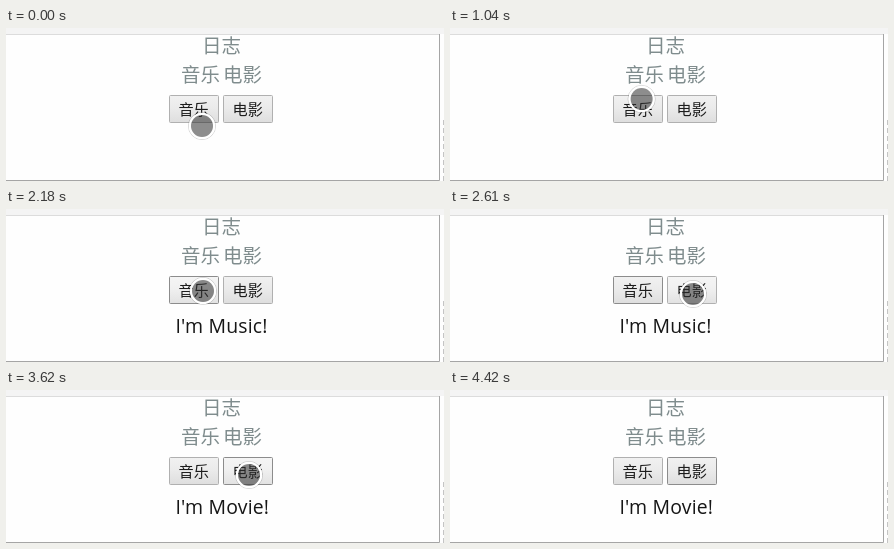
Animation of 438 by 153 pixels, one loop 4.85 s. Source, as an HTML page:

```html
<!DOCTYPE html>
<html lang="zh">
<head>
<meta charset="utf-8">
<style>
html, body { margin: 0; width: 100%; height: 100%; overflow: hidden; background: #fefefe; }
svg { display: block; }
text { font-family: "Noto Sans CJK SC", "Noto Sans CJK", "Noto Sans", sans-serif; }
.title { font-size: 19.5px; font-weight: 300; fill: #7f8c8d; }
.label { font-size: 15.2px; fill: #1c1c1c; }
#message { font-family: "Open Sans", "Noto Sans", sans-serif; font-size: 19.4px; letter-spacing: .2px; fill: #161616; }
</style>
</head>
<body>
<svg width="438" height="153" viewBox="0 0 438 153">
  <defs>
    <linearGradient id="face" x2="0" y2="1">
      <stop offset="0" stop-color="#f1f1f1"/>
      <stop offset=".45" stop-color="#ebebeb"/>
      <stop offset="1" stop-color="#dedede"/>
    </linearGradient>
    <linearGradient id="hover" x2="0" y2="1">
      <stop offset="0" stop-color="#f5f5f5"/>
      <stop offset=".45" stop-color="#f0f0f0"/>
      <stop offset="1" stop-color="#e2e2e2"/>
    </linearGradient>
  </defs>
  <rect width="438" height="153" fill="#fefefe"/>
  <rect width="438" height="6" fill="#f4f4f4"/>
  <path d="M0 6.5H433" stroke="#dcdcdc"/>
  <path d="M433.5 6V152.5H0" fill="none" stroke="#a5a5a5"/>
  <path d="M437.5 92V153" stroke="#c4c4c4" stroke-dasharray="5 3"/>
  <text class="title" x="196" y="24.5">日志</text>
  <text class="title" x="175" y="54">音乐</text>
  <text class="title" x="217" y="54">电影</text>
  <g id="buttons"></g>
  <text id="message" x="169.5" y="124"></text>
  <g id="pointer">
    <circle r="13.6" fill="none" stroke="#000" stroke-opacity=".16"/>
    <circle r="12" fill="none" stroke="#fff" stroke-width="2.4"/>
    <circle id="disc" r="11" fill="#303030"/>
  </g>
</svg>
<script>
const LOOP = 4850, STEP = 120;
const $ = id => document.getElementById(id);

const start = { x: 196, y: 98 };
const moves = [
  { at: 250, steps: 4, x: 190.5, y: 98 },
  { at: 920, steps: 4, x: 192, y: 62 },
  { at: 1670, steps: 2, x: 197, y: 82 },
  { at: 2340, steps: 3, x: 243, y: 85 },
  { at: 3750, steps: 2, x: 280, y: 101 },
  { at: 4170, steps: 2, x: 280, y: 122 }
];

const easeOut = p => 1 - (1 - p) ** 2;
const within = (t, from, to) => t >= from && t < to;

// The pointer eases towards each goal in visible steps
function pointerAt(t) {
  let { x, y } = start;
  for (const m of moves) {
    if (t < m.at) break;
    const step = Math.floor((t - m.at) / STEP) + 1;
    const p = easeOut(Math.min(1, step / m.steps));
    x += (m.x - x) * p;
    y += (m.y - y) * p;
  }
  return [x, y];
}

function addButton(x, label) {
  const g = document.createElementNS("http://www.w3.org/2000/svg", "g");
  g.innerHTML = `<rect x="${x + .5}" y="67.5" width="49" height="27" rx="1"/>
    <text class="label" x="${x + 9.5}" y="87">${label}</text>`;
  $("buttons").append(g);
  return g.firstChild;
}

const music = addButton(163, "音乐");
const movie = addButton(217, "电影");

function style(button, focused, hovered) {
  button.setAttribute("stroke", focused ? "#8c8c8c" : "#b0b0b0");
  button.setAttribute("fill", hovered ? "url(#hover)" : "url(#face)");
}

function draw(t) {
  $("pointer").setAttribute("transform", `translate(${pointerAt(t)})`);
  $("pointer").setAttribute("visibility", t < 4420 ? "visible" : "hidden");
  const pressed = within(t, 1940, 2180) || within(t, 2920, 3190);
  $("disc").setAttribute("fill-opacity", pressed ? .72 : .55);
  style(music, within(t, 2060, 3190), within(t, 1820, 2340));
  style(movie, t >= 3190, within(t, 2490, 4170));
  $("message").textContent = t < 2180 ? "" : t < 3190 ? "I'm Music!" : "I'm Movie!";
}

function tick() {
  draw(performance.now() % LOOP);
  requestAnimationFrame(tick);
}
tick();
</script>
</body>
</html>
```
